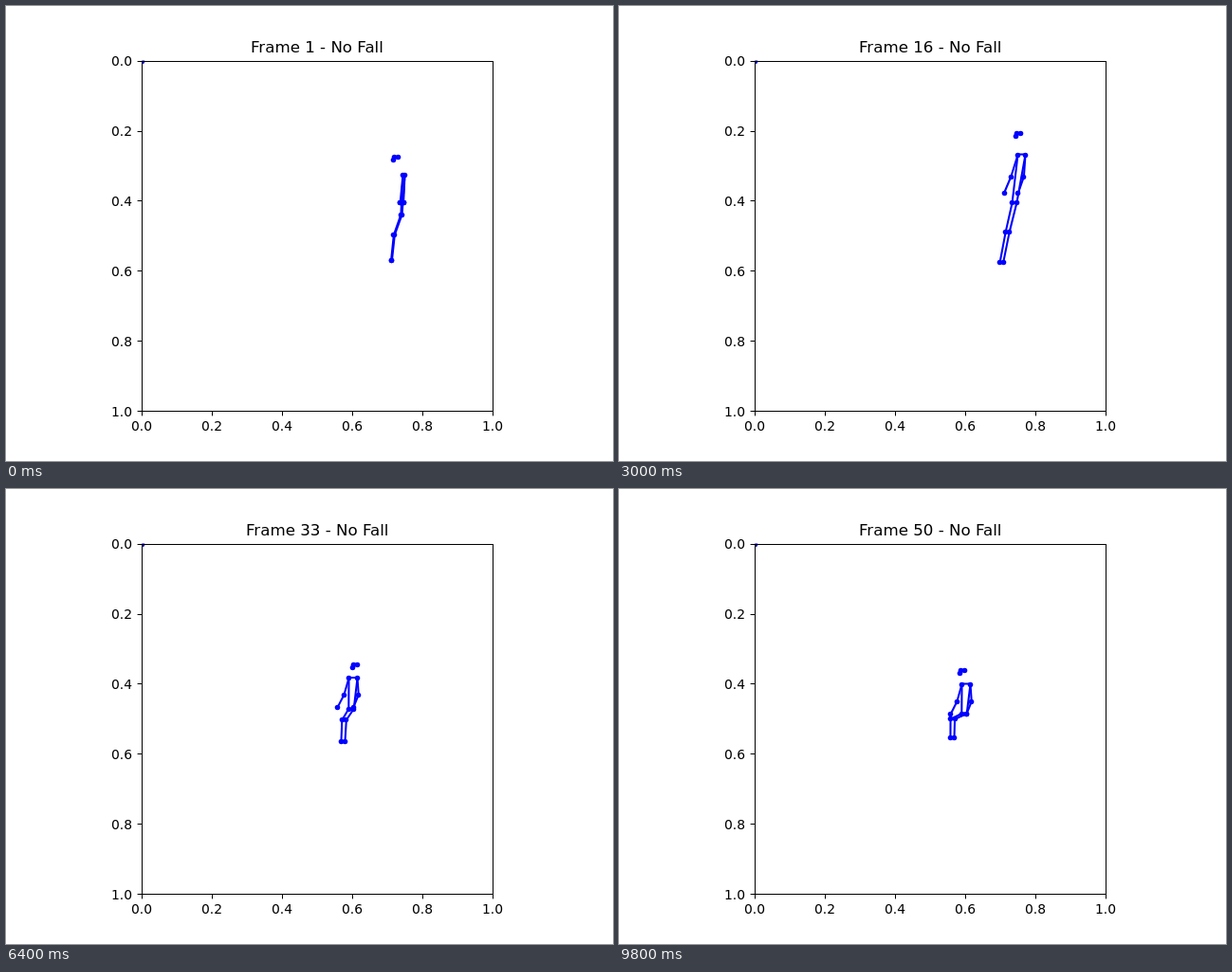
An HTML page with a canvas that plays this animation: 640x480 px, repeating every 10 s.

```html
<!DOCTYPE html>
<html lang="en">
<head>
<meta charset="utf-8">
<title>Skeleton plot</title>
<style>
  html, body { margin: 0; width: 100%; height: 100%; overflow: hidden; background: #fff; }
  canvas { display: block; }
</style>
</head>
<body>
<canvas id="stage" width="640" height="480"></canvas>
<script>
const ctx = document.getElementById('stage').getContext('2d');
const FONT = '"DejaVu Sans", sans-serif';
const STEP = 200, COUNT = 50;
const LEFT = 143.2, TOP = 57.6, SIZE = 369.6;

// Key points along the walk; width is half the shoulders, drop the height of an upper arm.
const KEYS = [
  { at: 1, head: [410, 160], neck: [419, 177.5], hip: [416.5, 219.5], foot: [406, 268], width: 1, drop: 29.5 },
  { at: 11, head: [429.5, 132], neck: [429, 153.5], hip: [418.5, 202.5], foot: [400.5, 271.5], width: 3, drop: 25.5 },
  { at: 16, head: [420, 135], neck: [424, 156.5], hip: [416.5, 207], foot: [403, 269.5], width: 4, drop: 23 },
  { at: 24, head: [382, 188], neck: [396, 189], hip: [415.5, 227], foot: [397.5, 276.5], width: 4, drop: 35 },
  { at: 33, head: [367, 186], neck: [365.5, 199], hip: [363.5, 231.5], foot: [355, 265.5], width: 4.5, drop: 17.5 },
  { at: 39, head: [351, 196], neck: [355.5, 205.5], hip: [365.5, 236.5], foot: [355.5, 264], width: 7.5, drop: 15.5 },
  { at: 50, head: [361, 192], neck: [365.5, 205.5], hip: [363.5, 236.5], foot: [351, 261.5], width: 4.5, drop: 18 }
];
const FACE = [[2.5, -1], [-1.5, -1], [-2, 2]];

const clamp = v => Math.max(0, Math.min(1, v));
const mix = (a, b, k) => Array.isArray(a) ? a.map((v, i) => mix(v, b[i], k)) : a + (b - a) * k;
const shift = ([x, y], dx, dy = 0) => [x + dx, y + dy];

// Rises from zero and back between two moments.
function hump(frame, start, end) {
  return Math.sin(Math.PI * clamp((frame - start) / (end - start)) ** 0.8);
}

function bodyAt(frame) {
  const i = Math.max(1, KEYS.findIndex(key => key.at >= frame));
  const a = KEYS[i - 1], b = KEYS[i];
  const k = (frame - a.at) / (b.at - a.at);
  const body = {};
  for (const name in a) body[name] = mix(a[name], b[name], k);
  return body;
}

// The knee bends with the length of the leg and the lean of the torso.
function kneeOf({ hip, foot }, lean) {
  const dx = hip[0] - foot[0], leg = foot[1] - hip[1];
  return shift(foot, dx * (leg - 25) / 100 - 0.15 * lean, -11 - 0.33 * leg);
}

function sideOf(body, side, reach) {
  const lean = body.hip[0] - body.neck[0];
  const spread = side * body.width;
  const swing = 0.45 * lean - 1 + 0.7 * spread;
  const shoulder = shift(body.neck, spread);
  const elbow = shift(shoulder, swing, body.drop);
  const wrist = shift(elbow, (0.3 * swing - 7.5) * reach, body.drop * reach);
  const hip = shift(body.hip, 0.6 * spread);
  const knee = shift(kneeOf(body, lean), 0.5 * spread);
  const foot = shift(body.foot, 0.45 * spread);
  return { arm: [shoulder, elbow, wrist], leg: [shoulder, hip, knee, foot] };
}

function path(points) {
  ctx.beginPath();
  for (const [x, y] of points) ctx.lineTo(x, y);
  ctx.stroke();
}

function dot([x, y]) {
  ctx.beginPath();
  ctx.arc(Math.round(x) + 0.5, Math.round(y) + 0.5, 2.78, 0, 7);
  ctx.fill();
}

// The anchor is 0 for the left end, 0.5 for the middle, 1 for the right end.
function text(str, x, y, size, anchor) {
  ctx.font = `${size}px ${FONT}`;
  ctx.fillText(str, Math.round(x - ctx.measureText(str).width * anchor), Math.round(y));
}

function drawAxes() {
  ctx.strokeStyle = ctx.fillStyle = '#000';
  ctx.lineWidth = 1;
  ctx.strokeRect(143.5, 58.5, 370, 369);
  for (let i = 0; i <= 5; i++) {
    const label = (i / 5).toFixed(1);
    const x = LEFT + SIZE * i / 5, y = TOP + SIZE * i / 5;
    const px = Math.round(x) + 0.5, py = Math.round(y) + 0.5;
    path([[px, 427.5], [px, 432.4]]);
    path([[138.6, py], [143.5, py]]);
    text(label, x, 448, 13.89, 0.5);
    text(label, 133.4, y + 5.8, 13.89, 1);
  }
}

function drawBody(frame) {
  const body = bodyAt(frame);
  const reach = 0.75 * clamp((frame - 1) / 10);
  const left = sideOf(body, 1, reach), right = sideOf(body, -1, reach);
  const dip = hump(frame, 24, 31);
  ctx.save();
  ctx.beginPath();
  ctx.rect(LEFT, TOP, SIZE, SIZE);
  ctx.clip();
  ctx.strokeStyle = ctx.fillStyle = '#00f';
  ctx.lineWidth = 2.08;
  ctx.lineJoin = 'round';
  dot([LEFT, TOP]);
  ctx.translate(8 * hump(frame, 1, 11) + 10 * dip, 12 * dip);
  for (const { arm, leg } of [left, right]) {
    path(arm.map(p => shift(p, 0.5, 0.5)));
    path(leg.map(p => shift(p, 0.5, 0.5)));
    [...arm, ...leg.slice(1)].forEach(dot);
  }
  path([left.arm[0], right.arm[0]]);
  path([left.leg[1], right.leg[1]]);
  for (const [dx, dy] of FACE) dot(shift(body.head, dx, dy));
  ctx.restore();
}

function draw(now) {
  const frame = Math.floor(now / STEP) % COUNT + 1;
  ctx.fillStyle = '#fff';
  ctx.fillRect(0, 0, 640, 480);
  drawBody(frame);
  drawAxes();
  text(`Frame ${frame} - No Fall`, 328, 49, 16.67, 0.5);
}

const begin = performance.now();
function tick() {
  draw(performance.now() - begin);
  requestAnimationFrame(tick);
}
tick();
</script>
</body>
</html>
```
